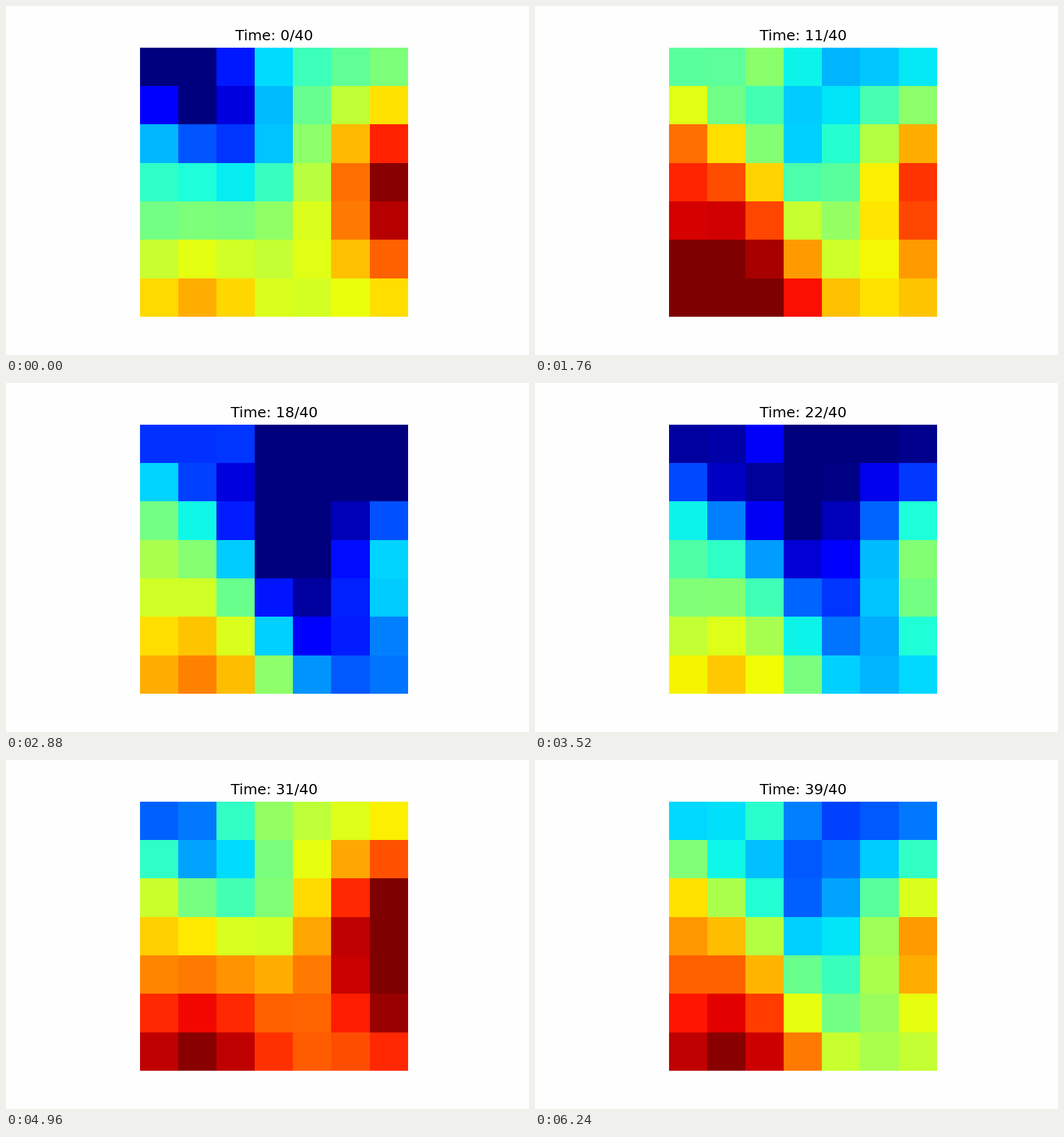
These frames come from a looping animation (917 by 611 pixels, 6.4 s). A matplotlib script:

```python
import numpy as np
import matplotlib.pyplot as plt
from matplotlib.animation import FuncAnimation

W, H, DPI = 917, 611, 128
PX = 72 / DPI            # points per pixel
LEFT, TOP, RIGHT, BOTTOM = 235, 73, 705, 544
STEPS, STEP_MS = 40, 160
PERIOD = 27              # steps per heat cycle

y, x = np.mgrid[0:7, 0:7].astype(float)


def bump(height, dx, dy, x_width, y_width):
    return height * np.exp(-(dx / x_width) ** 2 - (dy / y_width) ** 2)


# Resting heat: a downward ramp, two warm bumps and a slanted cold one
base = (36 + 3 * y
        + bump(58, x - 7, y - 3.1, 2.6, 2.4)
        + bump(22, x - 1, y - 6.2, 2, 2)
        - bump(40, x - 0.4 - 0.8 * y, y, 1.8, 2.7))

# How far each cell follows the left side; the border softens at the bottom
fade = (y / 6) ** 4
low = 0.28 * fade - 0.03
high = 1.08 - 0.25 * y / 6
share = low + (high - low) / (1 + np.exp((x - 2.5 - 0.9 * fade) / 0.45))

# Heat gained by each side at a few moments
key_times = np.array([0, 4, 11, 18, 26, 31, 39])
left_keys = np.array([-5, 20, 44, 14, 5, 24, 32])
right_keys = np.array([4.5, 24, -8.5, -60, -4.5, 20, -19.5])


def wave(t):
    a = 2 * np.pi * np.asarray(t) / PERIOD
    return np.stack([np.ones_like(a), np.cos(a), np.sin(a)], axis=-1)


def curve(keys):
    """A sine wave fitted to the keys, nudged to pass through each of them."""
    coef = np.linalg.lstsq(wave(key_times), keys, rcond=None)[0]
    rest = keys - wave(key_times) @ coef
    t = np.arange(STEPS, dtype=float)
    return wave(t) @ coef + np.interp(t, key_times, rest)


left, right = curve(left_keys), curve(right_keys)


def field(t):
    return base + right[t] + share * (left[t] - right[t])


fig = plt.figure(figsize=(W / DPI, H / DPI), dpi=DPI, facecolor="#fefefe")
ax = fig.add_axes([LEFT / W, 1 - BOTTOM / H,
                   (RIGHT - LEFT) / W, (BOTTOM - TOP) / H])
ax.axis("off")
image = ax.imshow(field(0), cmap="jet", vmin=0, vmax=100,
                  interpolation="nearest", aspect="auto")
title = ax.set_title("", fontsize=W / 36 * PX, pad=13.2 * PX,
                     fontfamily="DejaVu Sans")


def draw(t):
    image.set_data(field(t))
    title.set_text(f"Time: {t}/{STEPS}")
    return image, title


anim = FuncAnimation(fig, draw, frames=STEPS, interval=STEP_MS,
                     repeat=True, repeat_delay=0)
plt.show()
```
